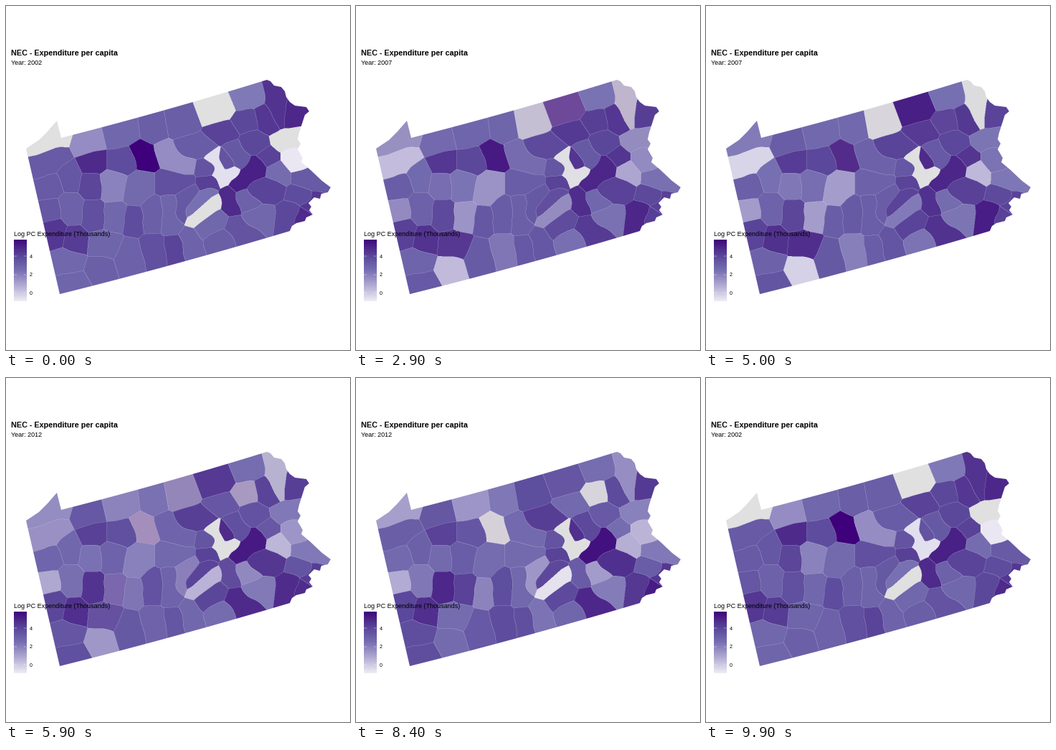
A matplotlib script for the animation above (10 s loop, 480 by 480 pixels).

```python
import math
import numpy as np
import matplotlib.pyplot as plt
from matplotlib.animation import FuncAnimation
from matplotlib.patches import Polygon

SIZE, DPI, FINE = 480, 100, 2
PX = 72 / DPI
FRAMES, INTERVAL = 100, 100
YEARS = (2002, 2007, 2012)
NA = None
plt.rcParams["font.family"] = "Liberation Sans"


# ---- colour: ramps and tweens run in CIE Lab ----
TO_XYZ = np.array([[0.4124, 0.3576, 0.1805],
                   [0.2126, 0.7152, 0.0722],
                   [0.0193, 0.1192, 0.9505]])
WHITE = TO_XYZ.sum(axis=1)


def rgb_to_lab(rgb):
    rgb = np.asarray(rgb) / 255
    lin = np.where(rgb > 0.04045, ((rgb + 0.055) / 1.055) ** 2.4, rgb / 12.92)
    xyz = lin @ TO_XYZ.T / WHITE
    f = np.where(xyz > 0.008856, np.cbrt(xyz), 7.787 * xyz + 16 / 116)
    x, y, z = f[..., 0], f[..., 1], f[..., 2]
    return np.stack([116 * y - 16, 500 * (x - y), 200 * (y - z)], axis=-1)


def lab_to_rgb(lab):
    y = (lab[..., 0] + 16) / 116
    f = np.stack([y + lab[..., 1] / 500, y, y - lab[..., 2] / 200], axis=-1)
    xyz = np.where(f > 0.2069, f ** 3, (f - 16 / 116) / 7.787) * WHITE
    lin = np.clip(xyz @ np.linalg.inv(TO_XYZ).T, 0, 1)
    return np.where(lin > 0.0031308, 1.055 * lin ** (1 / 2.4) - 0.055, 12.92 * lin)


STOPS = rgb_to_lab([(239, 237, 245), (119, 112, 178), (94, 77, 158), (62, 0, 123)])
GREY = rgb_to_lab((224, 224, 224))


def ramp(t):
    return np.stack([np.interp(t, (0, 0.5, 0.7, 1), STOPS[:, i]) for i in range(3)], axis=-1)


# ---- map: every point of the state belongs to the county with the nearest spine ----
axis = (np.arange(SIZE * FINE) + 0.5) / FINE
gx, gy = np.meshgrid(axis.astype(np.float32), axis.astype(np.float32))
nearest = np.full(gx.shape, np.inf, np.float32)
owner = np.zeros(gx.shape, int)
levels = []


def county(values, *spine):
    """Claim the area around a spine; values are percent of the scale per year."""
    for (x0, y0), (x1, y1) in zip(spine, spine[1:]):
        dx, dy = x1 - x0, y1 - y0
        t = np.clip(((gx - x0) * dx + (gy - y0) * dy) / (dx * dx + dy * dy), 0, 1)
        dist = (gx - x0 - t * dx) ** 2 + (gy - y0 - t * dy) ** 2
        closer = dist < nearest
        nearest[closer] = dist[closer]
        owner[closer] = len(levels)
    levels.append([GREY if v is NA else ramp(v / 100) for v in values])


# northern tier
county((NA, 46, 32), (42, 192), (75, 184))
county((62, 6, 60), (48, 223), (74, 209))
county((38, 60, 66), (106, 193), (122, 189))
county((55, 56, 33), (152, 182), (170, 177))
county((60, 55, 46), (202, 173), (207, 171))
county((60, NA, 70), (241, 165), (252, 160))
county((NA, 92, 70), (284, 148), (302, 142))
county((46, 50, 52), (331, 130), (347, 126))
county((82, NA, 35), (375, 119), (381, 158))
county((87, 74, 78), (403, 142), (396, 158))

# north-east
county((NA, 48, 45), (382, 188), (400, 182))
county((80, 80, 70), (360, 153), (370, 165))
county((72, 78, NA), (331, 162), (338, 158))
county((75, 80, 52), (294, 180), (308, 177))
county((61, 74, 78), (252, 199), (281, 196))
county((63, 62, 72), (316, 201), (325, 216))
county((66, 86, 85), (303, 212), (310, 219))
county((5, NA, NA), (291, 210), (299, 243), (316, 233))
county((72, 73, 62), (341, 190), (355, 193))
county((75, 82, 50), (365, 207), (368, 212))
county((2, 50, 23), (398, 212), (404, 222))
county((52, 20, 22), (377, 229), (387, 238))

# south-east
county((62, 47, 45), (408, 239), (438, 250))
county((70, 72, 60), (403, 261), (418, 266))
county((80, 74, 80), (434, 267), (424, 282))
county((86, 74, 92), (418, 291), (414, 297))
county((72, 92, 80), (388, 300), (397, 286))
county((74, 75, 84), (350, 256), (377, 255))
county((90, 87, 96), (322, 248), (350, 225))
county((86, 84, 60), (309, 262), (314, 280))
county((58, 54, 30), (330, 268), (338, 275))
county((55, 48, 44), (345, 294), (362, 297))
county((66, 82, 88), (318, 306), (338, 321))

# south-centre
county((60, 48, 55), (292, 329), (302, 325))
county((55, 74, 72), (275, 310), (297, 298))
county((NA, 48, 4), (264, 297), (290, 272))
county((50, 74, 74), (256, 284), (284, 261))
county((63, 63, 32), (243, 289), (258, 258))
county((76, 74, 75), (276, 247), (291, 246))
county((66, 64, 66), (275, 228), (287, 226))
county((68, 58, 52), (222, 246), (252, 246))
county((38, 58, 55), (222, 207), (252, 224))
county((100, 90, NA), (187, 204), (198, 215))
county((53, 30, 52), (181, 260), (193, 246))
county((56, 60, 54), (229, 280), (232, 304))
county((74, 60, 68), (235, 335), (234, 348))
county((57, 66, 48), (257, 322), (259, 340))

# north-west
county((70, 73, 64), (155, 216), (168, 213))
county((86, 78, 74), (115, 220), (126, 216))
county((64, 50, 58), (90, 232), (91, 242))
county((73, 46, 52), (116, 246), (119, 252))
county((42, 50, 62), (147, 245), (149, 255))
county((62, 60, 53), (56, 254), (62, 251))
county((64, 32, 23), (60, 285), (61, 285))
county((58, 58, 46), (90, 278), (93, 288))
county((68, 72, 88), (120, 288), (123, 296))
county((55, 29, 76), (152, 291), (152, 300))

# south-west
county((80, 74, 72), (67, 313), (68, 319))
county((78, 83, 84), (95, 324), (98, 328))
county((56, 86, 52), (131, 331), (146, 331))
county((55, 57, 70), (80, 357), (91, 358))
county((56, 65, 70), (88, 388), (98, 386))
county((59, 8, 52), (128, 369), (132, 368))
county((58, 63, 63), (171, 341), (173, 356))
county((70, 62, 40), (178, 297), (178, 304))
county((59, 62, 70), (207, 284), (203, 301))
county((68, 42, 70), (204, 334), (213, 350))

levels = np.array(levels).transpose(1, 0, 2)
border = np.zeros(owner.shape, bool)
border[:, 1:] |= owner[:, 1:] != owner[:, :-1]
border[1:] |= owner[1:] != owner[:-1]
border = 0.4 * border[..., None].astype(np.float32)
LINE = np.array((0.86, 0.85, 0.92), np.float32)


def paint(lab):
    rgb = lab_to_rgb(lab).astype(np.float32)[owner]
    rgb += (LINE - rgb) * border
    return rgb.reshape(SIZE, FINE, SIZE, FINE, 3).mean(axis=(1, 3))


def arc(start, end, sag=2, n=12):
    """A parallel of latitude, bowed slightly downwards."""
    t = np.linspace(0, 1, n)[:, None]
    points = np.array(start) + (np.array(end) - start) * t
    points[:, 1] += (4 * sag * t * (1 - t))[:, 0]
    return points


lake = [(28, 199), (46, 187), (58, 175), (71, 160)]
river = [(369, 105), (374, 111), (384, 113), (389, 119), (391, 127), (396, 134), (403, 139),
         (419, 141), (423, 147), (417, 152), (409, 177), (407, 186), (411, 192), (407, 200),
         (414, 212), (412, 218), (424, 228), (441, 244), (453, 253), (449, 260), (440, 262),
         (438, 269), (430, 267), (422, 275), (426, 280), (423, 285), (428, 291), (419, 295),
         (417, 300), (405, 303), (399, 307)]
outline = np.vstack([lake, arc((77, 184), (364, 103)), river, arc((396, 314), (75, 402))])

# ---- figure ----
fig = plt.figure(figsize=(SIZE / DPI, SIZE / DPI), dpi=DPI, facecolor="white")
ax = fig.add_axes([0, 0, 1, 1])
ax.axis("off")

state = ax.imshow(paint(levels[0]), extent=(0, SIZE, SIZE, 0), interpolation="nearest", zorder=1)
state.set_clip_path(Polygon(outline, transform=ax.transData))


def label(x, y, text, px, **kw):
    return ax.text(x, y, text, fontsize=px * PX, va="baseline", zorder=4, **kw)


label(6.7, 69, "NEC - Expenditure per capita", 10.8, weight="bold")
year = label(6.7, 82, "", 9)
label(11, 321, "Log PC Expenditure (Thousands)", 9)

# legend
LEFT, RIGHT, TOP, BOTTOM = 11, 28.3, 326, 412
bar = lab_to_rgb(ramp(np.linspace(1, 0, 172)))[:, None, :]
ax.imshow(bar, extent=(LEFT, RIGHT, BOTTOM, TOP), aspect="auto", zorder=3)
for value in (0, 2, 4):
    y = 400 - 12.75 * value
    for x in (LEFT, RIGHT - 3.5):
        ax.plot([x, x + 3.5], [y, y], color="white", lw=0.4 * PX, zorder=4)
    label(33, y + 2.6, str(value), 7.2)
ax.set(xlim=(0, SIZE), ylim=(SIZE, 0))


# ---- timing: each year rests for a sixth of the loop, then blends for a sixth ----
def update(k):
    step = FRAMES / (2 * len(YEARS))
    lab, shown = levels[0], 0
    for i in range(len(YEARS)):
        start = math.ceil(step * (2 * i + 1)) - 1
        end = min(math.floor(step * (2 * i + 2)), FRAMES - 1)
        if k > start:
            p = min((k - start) / (end - start), 1)
            after = (i + 1) % len(YEARS)
            lab = levels[i] + (levels[after] - levels[i]) * p
            shown = after if p > 0.5 else i
    state.set_data(paint(lab))
    year.set_text(f"Year: {YEARS[shown]}")
    return state, year


anim = FuncAnimation(fig, update, frames=FRAMES, interval=INTERVAL, repeat=True, repeat_delay=0)
plt.show()
```
